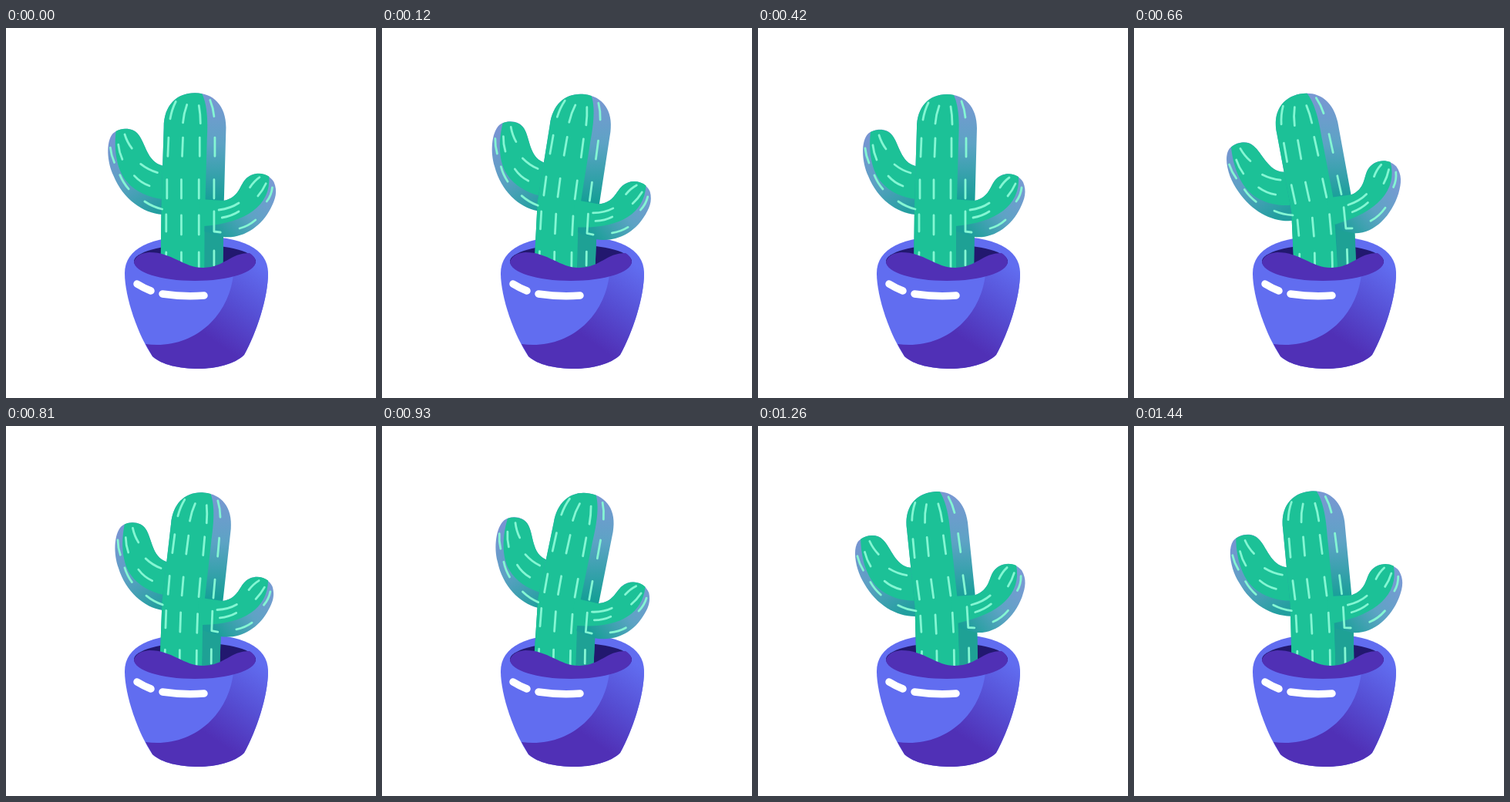
Animation of 480x480 px, one loop 1470 ms. Source, as an HTML page:

```html
<!DOCTYPE html>
<html lang="en">
<head>
<meta charset="utf-8">
<title>Swaying cactus</title>
<style>
  html, body { margin: 0; height: 100%; overflow: hidden; background: #fff; }
  svg { display: block; width: 100%; height: 100%; }
  .green { fill: #1cc197; }
  .marks { fill: none; stroke: #84f6d3; stroke-width: 2.8; stroke-linecap: round; stroke-linejoin: round; }
  .shine { fill: none; stroke: #fff; stroke-width: 9.5; stroke-linecap: round; }
</style>
</head>
<body>
<svg viewBox="0 0 480 480">
  <defs>
    <linearGradient id="potShade" gradientUnits="userSpaceOnUse" x1="336" y1="312" x2="270" y2="406">
      <stop offset="0" stop-color="#616df0"/>
      <stop offset=".5" stop-color="#564fd4"/>
      <stop offset="1" stop-color="#5030b6"/>
    </linearGradient>
    <linearGradient id="bodyShade" gradientUnits="userSpaceOnUse" x1="0" y1="90" x2="0" y2="224">
      <stop offset="0" stop-color="#7898d2"/>
      <stop offset=".45" stop-color="#5da3c5"/>
      <stop offset="1" stop-color="#169f97"/>
    </linearGradient>
    <linearGradient id="leftShade" gradientUnits="userSpaceOnUse" x1="140" y1="140" x2="200" y2="236">
      <stop offset="0" stop-color="#7894d2"/>
      <stop offset=".5" stop-color="#5da0c4"/>
      <stop offset="1" stop-color="#229f9f"/>
    </linearGradient>
    <linearGradient id="rightShade" gradientUnits="userSpaceOnUse" x1="346" y1="200" x2="268" y2="264">
      <stop offset="0" stop-color="#7a9ad4"/>
      <stop offset=".5" stop-color="#5da3c4"/>
      <stop offset="1" stop-color="#1a9f98"/>
    </linearGradient>
  </defs>

  <path fill="#616df0" d="M154 318C154 286 188 270 247 270C306 270 340 286 340 318C340 350 325 395 309 424C297 436 272 442 250 442C225 442 202 437 190 426C172 400 154 350 154 318Z"/>
  <path fill="url(#potShade)" d="M295 320C288 378 240 418 181 410L190 426C202 437 225 442 250 442C272 442 297 436 309 424C325 395 340 350 340 318Q338 306 330 300Z"/>
  <ellipse cx="245" cy="303" rx="79" ry="22" fill="#22186f"/>

  <g id="cactus">
    <path fill="url(#leftShade)" d="M215 182L204 179C185 174 183 150 174 139C167 129 150 130 142 138C133 149 135 175 143 192C155 222 180 240 204 242L215 242Z"/>
    <path class="green" d="M215 182L204 179C185 174 183 150 174 139C168 131 155 130 146 135C143 162 148 186 160 200C171 213 188 220 204 222L215 224Z"/>
    <path fill="url(#bodyShade)" d="M202 320L203 230L206 130C206 102 222 86 245 86C268 86 284 102 284 130L281 240L280 320Z"/>
    <path class="green" d="M202 320L203 230L206 130C206 102 222 86 245 86Q250 86 254 87C262 104 261 130 260 150L258 224L257 320Z"/>
    <path fill="#1ea195" d="M257 250L281 250L280 320L257 320Z"/>
    <path fill="url(#rightShade)" d="M258 226L281 224C300 220 301 205 308 197C318 185 337 188 344 200C349 212 346 222 340 234C328 258 305 274 280 271L257 264Z"/>
    <path class="green" d="M250 222L281 224C300 220 301 205 308 197C316 188 329 187 338 193C340 230 310 252 257 257L250 257Z"/>
    <path class="marks" d="M221 97Q216 107 214 119M235 101Q231 112 230 124M250 102Q252 113 252 125M264 95Q268 105 269 116
      M212 143L211 167M230 143L229 167M251 143L251 167M270 143L270 167
      M210 197L210 221M228 197L228 221M250 197L250 221M269 197L269 221
      M209 242L209 264M228 243L228 268M250 243L250 268M269 238L269 264L277 265
      M209 291L208 310M228 291L228 312M250 291L250 312M269 289L269 308
      M157 139Q160 149 166 157M149 152Q150 162 154 171M139 156Q140 166 144 175
      M177 177Q187 185 198 188M169 192Q177 201 188 205M151 191Q155 201 162 209M182 225Q192 232 204 235
      M275 236Q290 234 300 227M279 246Q291 244 300 238M301 260Q312 257 321 249
      M326 194Q319 199 314 207M334 202Q330 211 324 218M342 207Q341 217 335 225"/>
  </g>

  <path fill="#5030b5" d="M166 303Q170 292 186 291C216 291 230 311 256 311C285 310 290 292 316 292Q323 296 324 303C324 317 289 328 245 328C201 328 166 317 166 303Z"/>
  <path class="shine" d="M170 332Q178 337 188 341M203 345Q230 349 257 347"/>
</svg>
<script>
  const LOOP = 1470, STEP = 30;
  // time, lean, stretch
  const keys = [
    [0, 0, 1], [90, 10, .6], [210, 17, .1], [300, 17, 0], [420, 0, 0], [540, -19, .8],
    [600, -21, 1], [660, -20.5, 1], [735, -7, .6], [810, 8, 0], [950, 17, 0],
    [1110, 13, 0], [1200, -2, .2], [1310, -20, .9], [1370, -20.5, 1], [1440, -12, 1]
  ];
  const parts = [...document.querySelectorAll('#cactus path')].map(el => [el, el.getAttribute('d')]);

  function key(i) {
    const n = keys.length, turn = Math.floor(i / n), [t, ...values] = keys[i - turn * n];
    return [t + turn * LOOP, ...values];
  }

  // Smooth periodic curve through one column of the keys
  function track(t, column) {
    const i = keys.findLastIndex(k => k[0] <= t);
    const [a, b, c, d] = [-1, 0, 1, 2].map(o => key(i + o));
    const span = c[0] - b[0], u = (t - b[0]) / span;
    const slope = (p, q) => (q[column] - p[column]) / (q[0] - p[0]) * span;
    const m0 = slope(a, c), m1 = slope(b, d), rise = c[column] - b[column];
    return b[column] + u * (m0 + u * (3 * rise - 2 * m0 - m1 + u * (m0 + m1 - 2 * rise)));
  }

  // Rotates the upper plant, bending softly to a planted base
  function bend(x, y, angle, stretch) {
    const up = 222 - y, dx = x - 243;
    const reach = up > 0 ? up : -36 * (1 - Math.exp(up / 36));
    const hold = Math.max(0, Math.min(1, (310 - y) / 60));
    const narrow = 1 - hold * (1 - Math.cos(angle));
    const lift = .012 * stretch - .25 * angle * angle;
    return [
      243 + dx * (1 + .035 * stretch) * narrow + angle * reach,
      y + .92 * angle * dx * hold - lift * Math.max(0, up)
    ];
  }

  function draw(now) {
    const t = Math.floor(now % LOOP / STEP) * STEP;
    const angle = track(t, 1) * .0107, stretch = track(t, 2);
    for (const [el, d] of parts) {
      el.setAttribute('d', d.replace(/(\d+) (\d+)/g, (_, x, y) =>
        bend(+x, +y, angle, stretch).map(v => v.toFixed(2)).join(' ')));
    }
  }

  const start = performance.now();
  function tick() {
    draw(performance.now() - start);
    requestAnimationFrame(tick);
  }
  tick();
</script>
</body>
</html>
```
